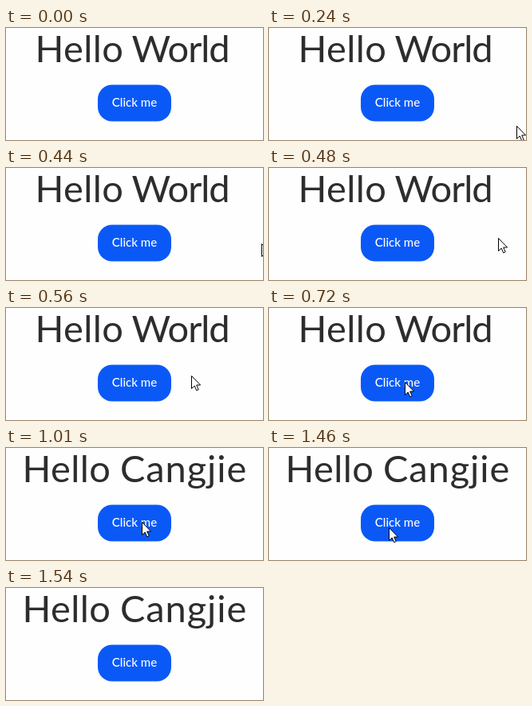
An HTML page for the animation above (2.41 s loop, 322 by 141 pixels).

```html
<!DOCTYPE html>
<html lang="en">
<head>
<meta charset="utf-8">
<title>Hello World</title>
<style>
  html, body { margin: 0; width: 100%; height: 100%; overflow: hidden; background: #fefefe; }
  svg { display: block; width: 322px; height: 141px; font-family: Lato, "Open Sans", sans-serif; }
  .title { font-size: 47px; fill: #2d2d2d; }
  .label { font-size: 15px; font-weight: 500; fill: #fff; text-anchor: middle; }
</style>
</head>
<body>
<svg viewBox="0 0 322 141">
  <g class="title">
    <text id="hello" y="42.5" letter-spacing=".4">Hello</text>
    <text id="world" x="157.5" y="42.5" letter-spacing="-1">World</text>
    <text id="cangjie" x="143" y="42.5" letter-spacing=".9">Cangjie</text>
  </g>
  <rect x="115" y="71.5" width="92" height="46" rx="18" fill="#0a59f7"/>
  <text class="label" x="161" y="99.3">Click me</text>
  <path id="cursor" d="M.5 .5V16.5L4.2 13L6.7 18.8L9.2 17.7L6.7 12H11.6Z" fill="#fff" stroke="#000"/>
</svg>
<script>
  const LOOP = 2410, CLICK = 1010;
  // Pointer samples: start time, x, y; no position means off stage.
  const pointer = [
    [0], [160, 224, 129], [240, 310, 123], [280],
    [440, 320, 95], [480, 287, 88], [520, 257, 85], [560, 232, 85],
    [600, 209, 87], [640, 187, 90], [720, 170, 93],
    [1460, 150, 100], [1500, 64, 129], [1540]
  ];
  const el = id => document.getElementById(id);
  const show = (id, on) => el(id).setAttribute('visibility', on ? 'visible' : 'hidden');

  function draw(now) {
    const t = now % LOOP, clicked = t >= CLICK;
    show('world', !clicked);
    show('cangjie', clicked);
    el('hello').setAttribute('x', clicked ? 20.5 : 36.5);

    const [, x, y] = pointer.findLast(p => p[0] <= t);
    show('cursor', x !== undefined);
    if (x !== undefined) el('cursor').setAttribute('transform', `translate(${x} ${y})`);
  }

  const start = performance.now();
  function tick() {
    draw(performance.now() - start);
    requestAnimationFrame(tick);
  }
  tick();
</script>
</body>
</html>
```
